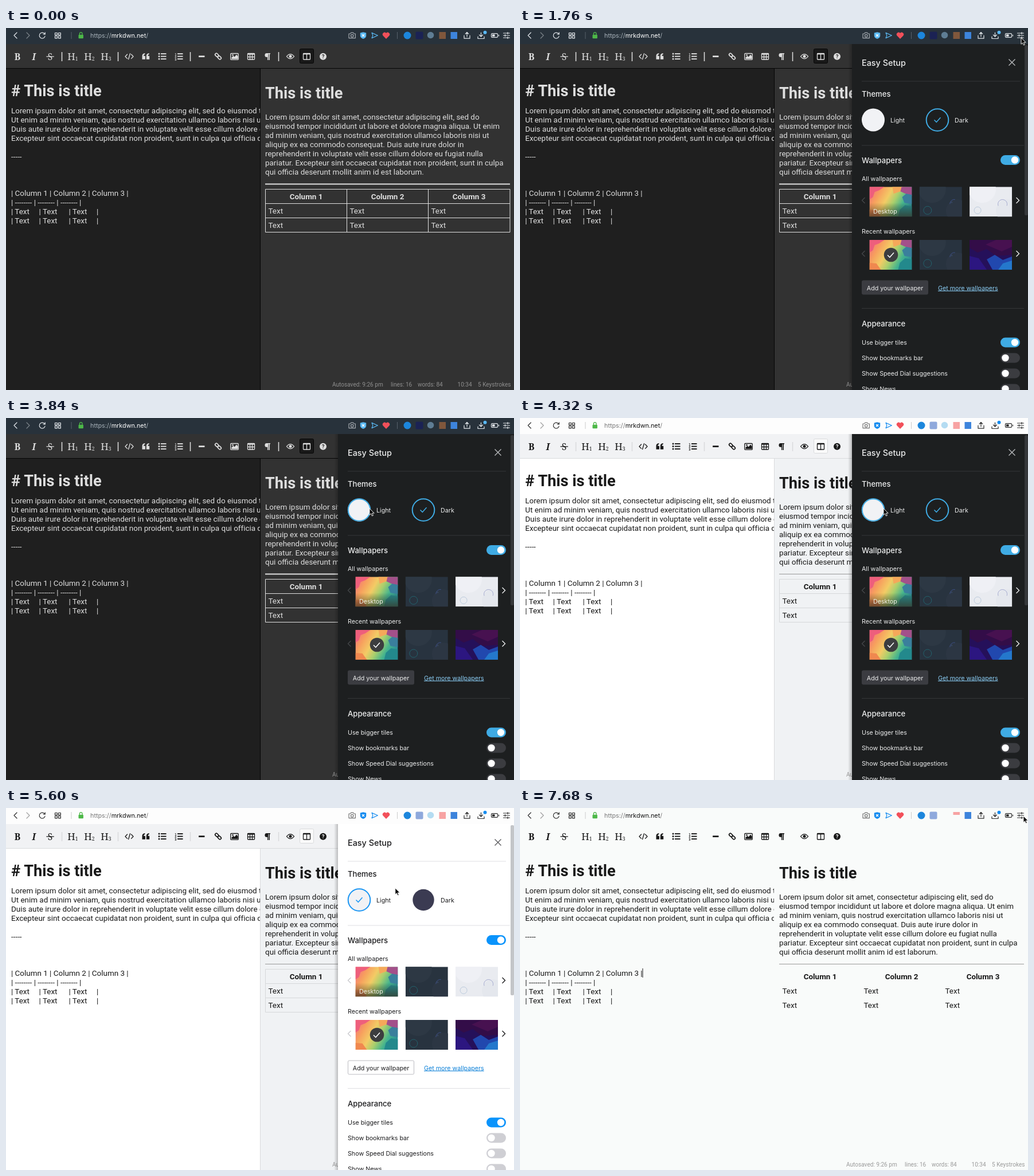
Recreate the animation shown at these times as an HTML page. Size 886 by 632 pixels, loop 8 s.

```html
<!DOCTYPE html>
<html lang="en">
<head>
<meta charset="utf-8">
<title>Markdown editor theme switch</title>
<style>
html, body { margin: 0; height: 100%; overflow: hidden; }
svg { display: block; }
.dark {
  --bar: #28323b; --ui: #e4e8ec; --host: #fff; --dim: #a9b3bb; --blue: #5ab8f2; --rule: #56616b;
  --tools: #323232; --edit: #1f1f1f; --view: #323232; --edge: #050505; --sep: #e0e0e0; --active: #191919;
  --ink: #dedede; --grid: #e0e0e0; --hr: #e0e0e0; --hrw: 2; --status: #8f8f8f;
  --ext1: #1b2254; --ext2: #5f7d94; --ext3: #80573c;
}
.light {
  --bar: #fdfdfd; --ui: #2c2c2c; --host: #111; --dim: #777; --blue: #168cf0; --rule: #ccc;
  --tools: #f1f2f4; --edit: #fff; --view: #f0f2f4; --edge: #d9dadc; --sep: #d9dadc; --active: #fafafa;
  --ink: #181818; --grid: #d6d8da; --hr: #999; --hrw: 1; --status: #9a9a9a;
  --ext1: #8fa9dc; --ext2: #b4dcf2; --ext3: #f7a3a3;
}
.wash { --bar: #f9fbfa; --tools: #f9fbfa; --edit: #f9fbfa; --view: #f9fbfa; --edge: #f9fbfa; --sep: #f9fbfa; --active: #f9fbfa; --grid: #f9fbfa; }
.wash #ext2 { display: none; }
.wash #ext3 { height: 5px; }
.panelDark {
  --pbg: #1d1f20; --ptext: #eceded; --pline: #343638; --accent: #3fabe4; --on: #3fabe4; --off: #3b3c40;
  --btn: #3b3c41; --btnLine: #3b3c41; --link: #8accf3; --thumb: #35373a; --weak: #45474a; --x: #b9bbbd;
}
.panelLight {
  --pbg: #fff; --ptext: #1c1c1e; --pline: #dfdfe2; --accent: #1b96f3; --on: #0a93fb; --off: #cfcfd4;
  --btn: #fff; --btnLine: #bcbcc2; --link: #0c80d8; --thumb: #c3c5c8; --weak: #c9c9cd; --x: #5a5a5e;
}
.panelDark .ifLight, .panelLight .ifDark { display: none; }
text { white-space: pre; }
.page { font: 13.45px Roboto, sans-serif; fill: var(--ink); }
.source { font-variant-ligatures: none; }
.bold { font-weight: 700; }
.h1 { font-size: 27.2px; font-weight: 700; }
.status { font: 10.07px Roboto, sans-serif; fill: var(--status); }
.ui { font: 10.7px Inter, sans-serif; }
.serif { font-family: "Noto Serif", serif; fill: var(--ink); text-anchor: middle; }
.head { font-size: 13.1px; font-weight: 500; }
.mid { text-anchor: middle; }
.line { fill: none; stroke-linecap: round; stroke-linejoin: round; }
</style>
</head>
<body>
<script>
const T = (x, y, s, attrs = '') => `<text x="${x}" y="${y}" ${attrs}>${s}</text>`;
const P = (d, attrs = '') => `<path d="${d}" ${attrs}/>`;
const R = (x, y, w, h, attrs = '') => `<rect x="${x}" y="${y}" width="${w}" height="${h}" ${attrs}/>`;
const C = (x, y, r, attrs = '') => `<circle cx="${x}" cy="${y}" r="${r}" ${attrs}/>`;
const fill = c => `fill="${c}"`;
const stroke = (c, w = 1) => `fill="none" stroke="${c}" stroke-width="${w}"`;
const lines = (x, y, step, list, attrs) => list.map((s, i) => T(x, y + i * step, s, attrs)).join('');

function browserBar() {
  return R(0, 0, 886, 28, fill('var(--bar)')) +
    `<g class="line" stroke="var(--ui)" stroke-width="1.2">` +
    P('M19 8l-5 5 5 5M67.4 10.4a5 5 0 1 0 .6 4M68.2 7.8v3.2h-3.2') +
    P('M36 8l5 5-5 5', 'opacity=".45"') +
    P('M85.5 8.5h3.8v3.8h-3.8zM91.5 8.5h3.8v3.8h-3.8zM85.5 14h3.8v3.8h-3.8zM91.5 14h3.8v3.8h-3.8z') +
    `<g opacity=".65">` + P('M598 10h2.6l1.2-1.8h3.8l1.2 1.8h2.6v7.6h-11.4z') + C(603.7, 13.6, 2.3) + '</g>' +
    P('M804 15V7.5m-2.8 2.8l2.8-2.8 2.8 2.8M799 13v5.2h10V13') +
    P('M828.5 8v7m-3-3l3 3 3-3M823 15v3.5h11V15') +
    R(846.5, 9.7, 11, 6.6, 'rx="1.6"') + P('M859.5 12v2') + R(848.6, 11.8, 3.4, 2.4, fill('var(--ui)')) +
    P('M867.5 9h11M867.5 13h11M867.5 17h11M875 7.6v2.8M870.5 11.6v2.8M875 15.6v2.8') + '</g>' +
    P('M114 7v12M682.5 7v12', stroke('var(--rule)')) +
    R(126.5, 11.8, 8.4, 6.4, 'rx="1" fill="#4db848"') +
    P('M128.4 12v-2a2.3 2.3 0 0 1 4.6 0v2', stroke('#4db848', 1.3)) +
    `<text x="147" y="17" class="ui" style="font-size:10.8px" fill="var(--dim)">https://<tspan fill="var(--host)">mrkdwn.net</tspan>/</text>` +
    P('M623 7.3l5.2 1.2v5q0 3.6-5.2 5.6q-5.2-2-5.2-5.6v-5z', fill('var(--blue)')) +
    P('M621 11l4 4m0-4l-4 4', stroke('#fff', 1.4)) +
    P('M638 8.4l10.4 4.6-10.4 4.6 1.8-4.6z', 'class="line" stroke="var(--blue)" stroke-width="1.2"') +
    P('M663 19l-5.4-5.6a3.4 3.4 0 0 1 5.4-4.4a3.4 3.4 0 0 1 5.4 4.4z', fill('#f2505a')) +
    C(700, 13, 6.5, fill('#1c86dc')) + R(714.5, 6.5, 13, 13, 'rx="2" fill="var(--ext1)"') +
    C(740.5, 12.5, 5.8, 'id="ext2" fill="var(--ext2)"') +
    R(755.5, 7, 11.5, 12, 'id="ext3" fill="var(--ext3)"') + R(775.5, 7, 11.5, 12, fill('#3d84dc')) +
    C(835.5, 7.8, 3, fill('var(--blue)'));
}

function toolbar() {
  const heading = (x, n) => T(x - 3, 56, 'H', 'class="serif" font-size="17"') + T(x + 6.2, 56.5, n, 'class="serif" font-size="8.5"');
  const quote = x => P(`M${x} 50.5v-1.5q0-4.6 4.8-4.9v2q-2.2.3-2.2 2.6h2.8v6h-5.4z`);
  const rows = x => [45, 49.5, 54].map(y => R(x, y - .9, 9.5, 1.9)).join('');
  return R(0, 28, 886, 42, fill('var(--tools)')) + R(0, 70, 886, 1, fill('var(--edge)')) +
    [97.5, 195.5, 321.5, 475.5].map(x => P(`M${x} 42v16`, stroke('var(--sep)', 1.5))).join('') +
    R(512.5, 36.5, 24, 25, 'rx="2" fill="var(--active)" stroke="var(--edge)"') +
    T(20, 55.5, 'B', 'class="serif bold" font-size="15.5"') +
    T(48.5, 55.5, 'I', 'class="serif bold" font-size="15.5" font-style="italic"') +
    T(77, 55.5, 'S', 'class="serif" font-size="15.5"') +
    [117, 146, 175].map((x, i) => heading(x, i + 1)).join('') +
    `<g fill="var(--ink)">` + quote(237.5) + quote(244.8) +
    rows(270) + [45, 49.5, 54].map(y => C(267, y, 1.5)).join('') + rows(299) +
    [1, 2, 3].map(n => T(294.3, 43.3 + n * 4.5, n, 'font-size="5.5" font-family="Roboto, sans-serif" font-weight="700"')).join('') +
    R(336, 48.2, 10.5, 2.7, 'rx=".6"') + P('M393.5 54v-2.5l3-3 2 2 3.5-4 2.5 3v4.5z') + C(395.5, 47.2, 1.2) +
    R(421, 44, 13, 2.5) + P('M461 44h-6.2a3.4 3.4 0 0 0 0 6.8h1.2v5.2h1.5v-10.5h1v10.5h1.5v-10.5h1z') +
    C(496, 49.5, 2.5) + R(518.5, 44, 12, 2.2) + C(553, 49.7, 6) + '</g>' +
    `<g class="line" stroke="var(--ink)" stroke-width="1.3">` +
    P('M70.8 49.8h12.5') +
    P('M211.5 46l-3.5 3.7 3.5 3.7M218.5 46l3.5 3.7-3.5 3.7M216.5 44.7l-3 10') +
    `<g transform="rotate(45 370 49.5)" stroke-width="1.7">` + R(363.5, 47.3, 6.5, 4.4, 'rx="2"') + R(370, 47.3, 6.5, 4.4, 'rx="2"') + '</g>' +
    R(391.8, 44.5, 13.4, 10.8, 'rx="1"') + R(421.5, 44.5, 12, 10.5, 'rx="1"') +
    P('M421.5 50.5h12M425.5 46v9M429.5 46v9M489.5 49.7q6.5-8 13 0q-6.5 8-13 0z') +
    R(518.5, 44.5, 12, 10.5, 'rx=".8"') + P('M524.5 46v9') + '</g>' +
    T(553, 53.2, '?', 'class="mid bold" font-size="9.5" font-family="Roboto, sans-serif" fill="var(--tools)"');
}

function editor() {
  const row = '| Text     | Text      | Text     |';
  return R(0, 71, 443, 561, fill('var(--edit)')) +
    `<svg width="443" height="632"><g class="page source">` + T(9, 118.5, '# This is title', 'class="h1"') +
    lines(9, 149, 16, [
      'Lorem ipsum dolor sit amet, consectetur adipiscing elit, sed do eiusmod tempor',
      'Ut enim ad minim veniam, quis nostrud exercitation ullamco laboris nisi ut aliquip',
      'Duis aute irure dolor in reprehenderit in voluptate velit esse cillum dolore eu',
      'Excepteur sint occaecat cupidatat non proident, sunt in culpa qui officia deserunt',
      '', '-----', '', '', '',
      '| Column 1 | Column 2 | Column 3 |', '| -------- | -------- | -------- |', row, row]) +
    '</g></svg>' + R(213.5, 280, 1, 16, 'id="caret" fill="var(--ink)"');
}

function preview() {
  const cols = [452.5, 594.5, 736.5];
  return R(443, 71, 443, 561, fill('var(--view)')) + R(443, 71, 1, 561, fill('var(--edge)')) +
    '<g class="page">' + T(452, 122.5, 'This is title', 'class="h1"') +
    lines(452, 160, 16, [
      'Lorem ipsum dolor sit amet, consectetur adipiscing elit, sed do',
      'eiusmod tempor incididunt ut labore et dolore magna aliqua. Ut enim',
      'ad minim veniam, quis nostrud exercitation ullamco laboris nisi ut',
      'aliquip ex ea commodo consequat. Duis aute irure dolor in',
      'reprehenderit in voluptate velit esse cillum dolore eu fugiat nulla',
      'pariatur. Excepteur sint occaecat cupidatat non proident, sunt in culpa',
      'qui officia deserunt mollit anim id est laborum.']) +
    P('M452 272.5h427', 'stroke="var(--hr)" style="stroke-width:var(--hrw)"') +
    P('M452.5 281.5h426.5v75h-426.5zM452.5 306.5h426.5M452.5 331.5h426.5M594.5 281.5v75M736.5 281.5v75', stroke('var(--grid)')) +
    cols.map((x, i) => T(x + 71, 298.5, 'Column ' + (i + 1), 'class="bold mid"') + lines(x + 5, 324.3, 25, ['Text', 'Text'])).join('') +
    '</g><g class="status">' +
    [[569, 'Autosaved: 9:26 pm'], [671, 'lines: 16'], [718, 'words: 84'], [787.5, '10:34'], [823, '5 Keystrokes']]
      .map(([x, s]) => T(x, 625.5, s)).join('') + '</g>';
}

// Wallpaper previews, each 74 x 52
const wallpapers = {
  colours: R(0, 0, 74, 52, fill('url(#spectrum)')) +
    P('M0 0h26l-9 6-8 3-3 9-6 4z', fill('#ee5f7c')) + P('M40 0h18l-4 8-12 4z', fill('#f5a85a')) +
    P('M56 0h18v16l-9-3-11-5z', fill('#a3508a')) + P('M74 14l-10-2-7 6 4 10 13 2z', fill('#3a7f9c')) +
    P('M0 52V40l12 1 8 11z', fill('#f0884f')) + P('M74 34l-12-2-9 8-3 12h24z', fill('#23898c')),
  night: R(0, 0, 74, 52, fill('#28333f')) + C(22, 4, 24, fill('#2d3844')) + C(66, 42, 20, fill('#2c3643')) +
    C(14, 41, 7, stroke('#23616b')) + P('M53 30a8 8 0 0 1 9-8', stroke('#3d4f86')) + C(56, 27, 1.5, fill('#36465e')),
  day: R(0, 0, 74, 52, fill('#e9ebf0')) + C(22, 4, 24, fill('#eff0f5')) + C(66, 42, 20, fill('#e4e7ed')) +
    P('M50 33a8 8 0 1 1 15 0', stroke('#a3a9cf')) + C(14, 41, 6, stroke('#bccbdd')),
  violet: R(0, 0, 74, 52, fill('#25105a')) + P('M0 0h74v26L46 28 30 16 14 22 0 14z', fill('#330d48')) +
    P('M28 8l18-8h28v12L56 20z', fill('#471150')) + P('M30 34l14-8 14 9 16-6v23H40z', fill('#2148ae')) +
    P('M50 52l8-11 16-5v16z', fill('#2478cc')) + P('M0 28l16 4 14 20H0z', fill('#2c1680')),
};

function panel() {
  const thumb = (x, y, name) => `<svg x="${x}" y="${y}" width="74" height="52">${wallpapers[name]}</svg>`;
  const thumbRow = (y, names) => names.map((name, i) => thumb(609.5 + i * 87.3, y, name)).join('');
  const toggle = (y, on) => R(838, y - 8.5, 34, 17, `rx="8.5" fill="var(--${on ? 'on' : 'off'})"`) + C(on ? 863 : 846.5, y, 6.2, fill('#fff'));
  const rule = (y, end) => P(`M596 ${y}H${end}`, stroke('var(--pline)'));
  const check = (x, y, c) => P(`M${x - 5.5} ${y + .5}l3.8 3.8 7.2-8`, stroke(c, 1.5));
  const arrows = y => P(`M601.5 ${y - 5}l-5 5 5 5`, stroke('var(--weak)', 1.3)) + P(`M865.5 ${y - 5}l5 5-5 5`, stroke('var(--ptext)', 1.4));
  const options = ['Use bigger tiles', 'Show bookmarks bar', 'Show Speed Dial suggestions', 'Show News'];
  return R(572, 28, 7, 604, fill('url(#shade)')) + R(579, 28, 307, 604, fill('var(--pbg)')) +
    R(880, 30, 6, 297, 'rx="2" fill="var(--thumb)"') + rule(93, 872) + rule(205, 879) + rule(489.5, 879) +
    `<g class="ui" fill="var(--ptext)">` + T(596, 65.5, 'Easy Setup', 'class="head" style="font-size:14.4px"') +
    T(596, 120, 'Themes', 'class="head"') + T(596, 235.5, 'Wallpapers', 'class="head"') + T(596, 520.5, 'Appearance', 'class="head"') +
    T(646, 164.5, 'Light') + T(758, 164.5, 'Dark') + T(596, 266.5, 'All wallpapers') + T(596, 359, 'Recent wallpapers') +
    R(596.5, 441, 115, 24, 'rx="2" fill="var(--btn)" stroke="var(--btnLine)"') + T(654, 457.5, 'Add your wallpaper', 'class="mid"') +
    T(729, 457.5, 'Get more wallpapers', 'fill="var(--link)" text-decoration="underline"') +
    options.map((s, i) => T(596, 553 + i * 27, s) + toggle(549 + i * 27, i === 0)).join('') +
    toggle(230.5, true) + P('M852.5 54.5l11 11m0-11l-11 11', stroke('var(--x)', 1.4)) +
    C(616, 160.5, 20, fill('#f1f2f5')) + C(616, 160.5, 19.3, 'id="ring" ' + stroke('var(--accent)', 2)) +
    `<g class="ifDark">${C(728, 160.5, 19.3, stroke('var(--accent)', 2))}${check(728, 160, 'var(--accent)')}</g>` +
    `<g class="ifLight">${check(616, 160, 'var(--accent)')}${C(728, 160.5, 18.7, fill('#3b3b52'))}</g>` +
    arrows(301) + arrows(394) + thumbRow(277.3, ['colours', 'night', 'day']) +
    R(609.5, 305, 74, 24.3, fill('url(#caption)')) + T(616, 323.5, 'Desktop', 'fill="#f0eee6"') +
    thumbRow(370, ['colours', 'night', 'violet']) +
    C(647, 396, 12.3, fill('#3c3d3f')) + check(646.5, 396, '#fff') + '</g>';
}

document.body.innerHTML = `<svg id="stage" width="886" height="632" viewBox="0 0 886 632">
  <defs>
    <linearGradient id="spectrum" x1="0" y1=".2" x2="1" y2=".6">
      <stop stop-color="#f3757a"/><stop offset=".2" stop-color="#f79f5e"/><stop offset=".42" stop-color="#f3cb65"/>
      <stop offset=".6" stop-color="#a9cf6d"/><stop offset=".8" stop-color="#45b48e"/><stop offset="1" stop-color="#2a8f95"/>
    </linearGradient>
    <linearGradient id="shade"><stop stop-opacity="0"/><stop offset="1" stop-opacity=".22"/></linearGradient>
    <linearGradient id="caption" x2="0" y2="1"><stop stop-color="#3a3020" stop-opacity="0"/><stop offset="1" stop-color="#3a3020" stop-opacity=".7"/></linearGradient>
  </defs>
  ${preview()}${editor()}${toolbar()}${browserBar()}
  <g id="panel">${panel()}</g>
  <g id="cursor">
    ${P('M0 0v11.3l2.6-2.4 1.8 4.1 2-.9-1.8-4h3.6z', 'id="arrow" fill="#0a0a0a" stroke="#fff" stroke-width=".9"')}
    ${P('M-1.3 1.2a1.3 1.3 0 0 1 2.6 0v4l4.7 1q1.6.5 1.4 2.5l-.8 5h-6.6l-4.5-6q.4-2 2.2-.6l1 1z', 'id="hand" fill="#fff" stroke="#222"')}
  </g>
</svg>`;

const $ = id => document.getElementById(id);
const show = (id, on) => $(id).style.display = on ? '' : 'none';
const LOOP = 8000, TICK = 160;

// time, x, y of the pointer tip
const pointerPath = [
  [960, 640, 15], [1120, 874, 17], [2240, 874, 17], [2880, 826, 480], [3040, 800, 538], [3360, 745, 437],
  [3840, 634, 158], [5440, 634, 158], [6240, 858, 67], [7200, 858, 67], [7680, 878, 14], [LOOP, 878, 14]];

function pointerAt(t) {
  const i = pointerPath.findIndex(p => p[0] > t);
  const [t0, x0, y0] = pointerPath[i - 1], [t1, x1, y1] = pointerPath[i];
  const k = (t - t0) / (t1 - t0);
  return [x0 + (x1 - x0) * k, y0 + (y1 - y0) * k];
}

function panelOpacity(t) {
  if (t < 1440 || t >= 6560) return 0;
  if (t < 1760) return t < 1600 ? .4 : .9;
  return t < 6400 ? 1 : .93;
}

function draw(now) {
  const t = Math.floor(now % LOOP / TICK) * TICK;
  $('stage').setAttribute('class', t < 4320 ? 'dark' : t < 6560 ? 'light' : 'light wash');
  $('panel').setAttribute('class', t < 4480 ? 'panelDark' : 'panelLight');
  $('panel').setAttribute('opacity', panelOpacity(t));
  show('ring', t >= 3840);
  show('caret', t >= 6560 && t < 7040 || t >= 7520);
  show('cursor', t >= 960);
  if (t >= 960) $('cursor').setAttribute('transform', `translate(${pointerAt(t)})`);
  const overClose = t >= 6240 && t < 6560;
  show('hand', overClose);
  show('arrow', !overClose);
}

const start = performance.now();
(function frame() {
  draw(performance.now() - start);
  requestAnimationFrame(frame);
})();
</script>
</body>
</html>
```
